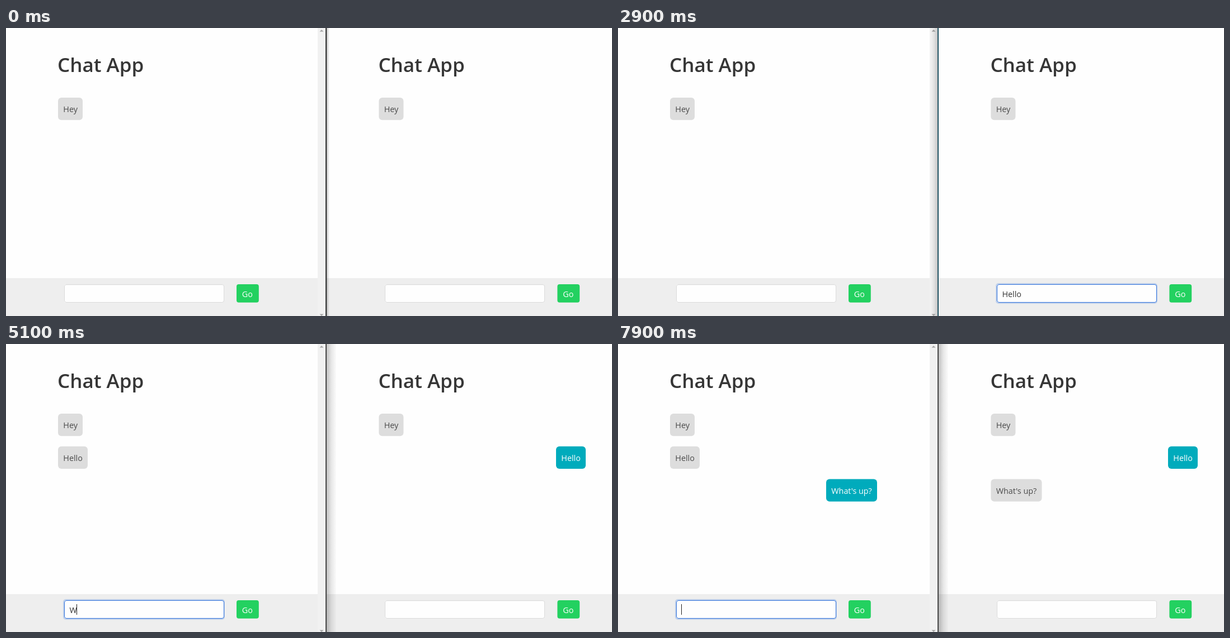
An HTML page with a canvas that plays this animation: 1083x517 px, repeating every 8 s.

```html
<!DOCTYPE html>
<html lang="en">
<head>
<meta charset="utf-8">
<title>Chat App</title>
<style>
  html, body { margin: 0; width: 100%; height: 100%; overflow: hidden; background: #fefefe; }
  canvas { display: block; width: 1083px; height: 517px; }
</style>
</head>
<body>
<canvas id="stage" width="1083" height="517"></canvas>
<script>
const ctx = document.getElementById('stage').getContext('2d');
const W = 1083, H = 517, LOOP = 8000;
const RIGHT = 573.4; // offset of the second window
const FAMILY = '"Open Sans", "Noto Sans", sans-serif';
const BODY = '14.35px ' + FAMILY;
const TITLE = '600 35px ' + FAMILY;
const BORDER = [219, 219, 219], HOVER = [172, 172, 172];

// Each entry: [time, value]; the latest one that has started applies.
const at = (track, t) => track.reduce((v, [start, next]) => t >= start ? next : v, track[0][1]);

const typing = {
  right: [[0, ''], [1700, 'H'], [1900, 'He'], [2000, 'Hel'], [2200, 'Hell'], [2400, 'Hello'], [3100, '']],
  left: [[0, ''], [5000, 'W'], [5200, 'Wh'], [5300, 'Wha'], [5400, 'What'], [6100, "What'"],
    [6300, "What's"], [6500, "What's "], [6700, "What's u"], [6900, "What's up"],
    [7600, "What's up?"], [7900, '']]
};
const caret = {
  right: [[0, false], [700, true], [1300, false], [1700, true], [2900, false], [3100, true],
    [3600, false], [4100, true], [4500, false]],
  left: [[0, false], [4400, true], [4900, false], [5000, true], [5900, false], [6100, true],
    [7400, false], [7600, true]]
};
const hover = {
  right: [[0, 0], [200, 0.4], [300, 0.75], [500, 1], [700, 0]],
  left: [[0, 0], [3800, 0.5], [3900, 1], [4400, 0]]
};
const focus = {
  right: [[0, false], [700, true], [4500, false]],
  left: [[0, false], [4400, true]]
};

function rect(x, y, w, h, fill) {
  ctx.fillStyle = fill;
  ctx.fillRect(x, y, w, h);
}

function round(x, y, w, h, r, fill) {
  ctx.beginPath();
  ctx.roundRect(x, y, w, h, r);
  ctx.fillStyle = fill;
  ctx.fill();
}

function text(str, x, y, color, font = BODY) {
  ctx.font = font;
  ctx.fillStyle = color;
  ctx.fillText(str, x, y);
}

function fade(x0, x1, from, to) {
  const g = ctx.createLinearGradient(x0, 0, x1, 0);
  g.addColorStop(0, `rgba(0,0,0,${from})`);
  g.addColorStop(0.5, `rgba(0,0,0,${from * 0.36 + to * 0.36})`);
  g.addColorStop(1, `rgba(0,0,0,${to})`);
  rect(x0, 0, x1 - x0, H, g);
}

function bubble(str, x, y, w, own) {
  round(x, y, w, 40.3, 6, own ? '#00abbc' : '#dddddd');
  text(str, x + 9.3, y + 26, own ? '#ffffff' : '#4a4a4a');
}

function input(x, side, t) {
  const focused = at(focus[side], t), mix = at(hover[side], t), str = at(typing[side], t);
  if (focused) round(x - 2, 458, 289, 37, 5, 'rgba(50,115,220,0.25)');
  round(x, 460, 285, 33, 3.5, '#fefefe');
  if (!focused) rect(x + 2, 461, 281, 1, '#f5f5f5');
  ctx.beginPath();
  ctx.roundRect(x + 0.5, 460.5, 285, 32, 3.5);
  ctx.strokeStyle = focused ? '#3273dc'
    : `rgb(${BORDER.map((c, i) => Math.round(c + (HOVER[i] - c) * mix))})`;
  ctx.lineWidth = 1;
  ctx.stroke();
  const start = x + 9.4;
  text(str, start, 483, '#363636');
  if (at(caret[side], t)) {
    rect(Math.floor(start + ctx.measureText(str).width), 467, 1, 19, '#222222');
  }
}

function panel(dx, side, t) {
  text('Chat App', 92 + dx, 79, '#363636', TITLE);
  bubble('Hey', 93 + dx, 125, 44, false);
  if (t >= 3100) {
    if (side === 'right') bubble('Hello', 983, 183.8, 53, true);
    else bubble('Hello', 93, 183.8, 53, false);
  }
  if (t >= 7900) {
    if (side === 'left') bubble("What's up?", 372, 242.5, 91, true);
    else bubble("What's up?", 93 + dx, 242.5, 91, false);
  }
  input(side === 'left' ? 104 : 677, side, t);
  round(412 + dx, 460, 39.8, 32.8, 4, '#23d160');
  text('Go', 421.8 + dx, 483, '#ffffff');
}

function arrow(y, dir) {
  ctx.beginPath();
  ctx.moveTo(560.5, y);
  ctx.lineTo(567.5, y);
  ctx.lineTo(564, y - 3.5 * dir);
  ctx.fillStyle = '#a3a3a3';
  ctx.fill();
}

function windowEdge(t) {
  const rightActive = t >= 700 && t < 4400;
  if (rightActive) fade(559, 571, 0, t < 800 ? 0.1 : 0.18);
  else if (t >= 4400) fade(573, 590, 0.24, 0.01);
  else fade(573, 578, 0.3, 0);
  rect(571, 0, 1, H, rightActive ? '#6f8f99' : '#77787a');
  rect(571.3, 0, 1.7, H, rightActive ? '#15495a' : t >= 4400 ? '#404040' : '#262626');
}

function draw(t) {
  rect(0, 0, W, H, '#fefefe');
  rect(0, 449, W, 68, '#eeeeee');
  rect(557, 0, 14, H, '#f1f1f1');
  arrow(6.5, 1);
  arrow(513.5, -1);
  windowEdge(t);
  panel(0, 'left', t);
  panel(RIGHT, 'right', t);
}

let origin;
function tick(now) {
  origin ??= now;
  draw((now - origin) % LOOP);
  requestAnimationFrame(tick);
}
draw(0);
requestAnimationFrame(tick);
</script>
</body>
</html>
```
